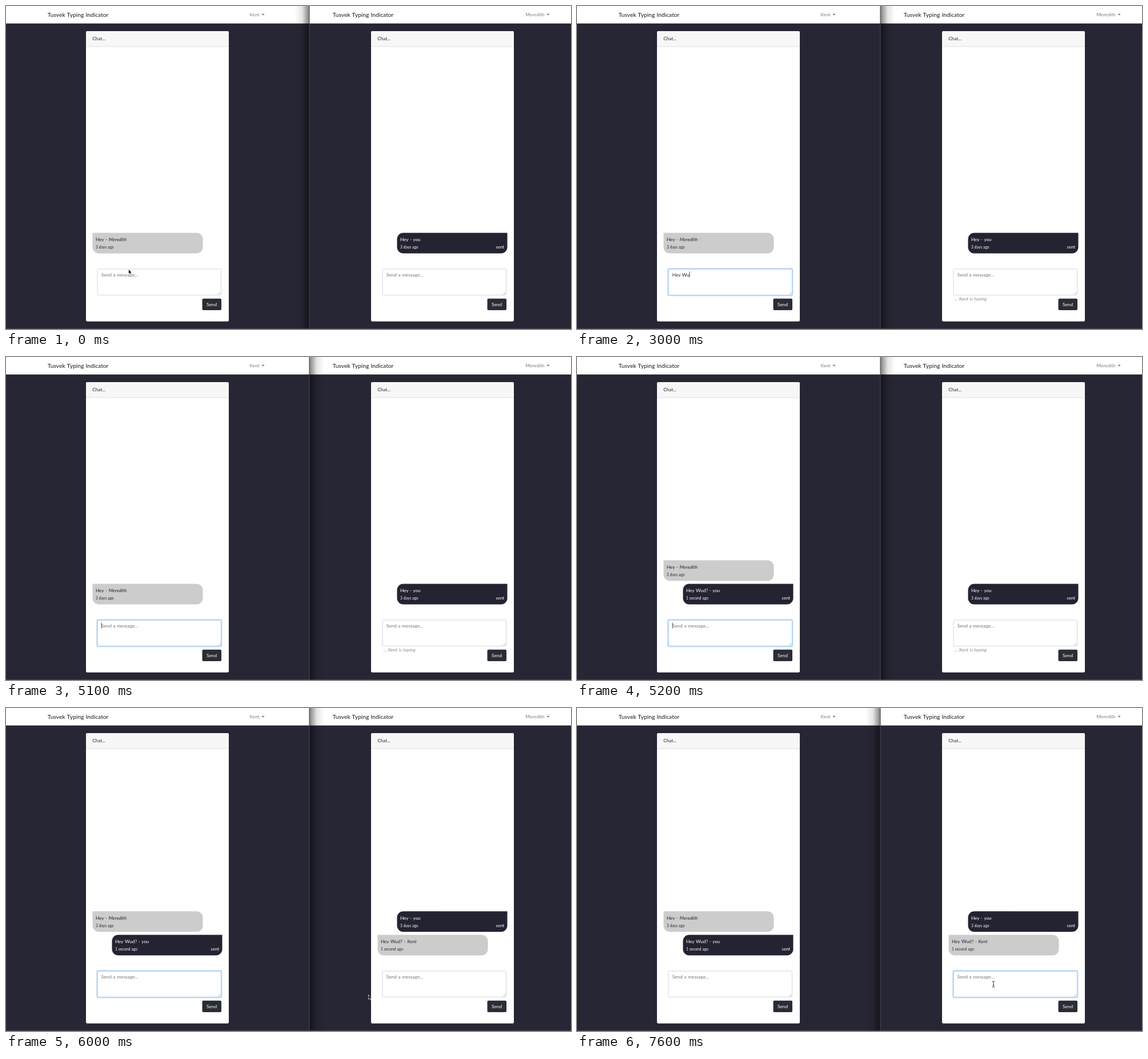
An HTML page for the animation above (8000 ms loop, 989 by 566 pixels).

```html
<!DOCTYPE html>
<html lang="en">
<head>
<meta charset="utf-8">
<title>Typing indicator</title>
<style>
  html, body { margin: 0; width: 100%; height: 100%; overflow: hidden; background: #272634; }
  svg { display: block; width: 989px; height: 566px; }
  text { font: 8.3px Lato, sans-serif; word-spacing: .06em; white-space: pre; fill: #212529; }
  .brand { font-size: 10.25px; fill: #191919; }
  .user { fill: #7f7f7f; text-anchor: end; }
  .small { font-size: 6.65px; }
  .end { text-anchor: end; }
  .hint { fill: #6c757d; }
  .light { fill: #fff; }
  .typing { fill: #8b8b8b; }
  .i { font-style: italic; }
</style>
</head>
<body>
<svg id="stage" viewBox="0 0 989 566"></svg>
<script>
const LOOP = 8000, STEP = 100, PANEL = 499, SPLIT = 531;
const LEFT = 'Kent', RIGHT = 'Meredith';
const stage = document.getElementById('stage');

const typed = [[0, ''], [1700, 'H'], [1800, 'He'], [2100, 'Hey'], [2600, 'Hey '], [2700, 'Hey W'],
  [3000, 'Hey Wu'], [3700, 'Hey Wud'], [4800, 'Hey Wud?'], [5100, '']];
const caretOn = [[0, 0], [800, 1], [1300, 0], [1700, 1], [3500, 0], [3700, 1], [4200, 0],
  [4700, 1], [5600, 0], [6100, 1], [6500, 0], [7100, 1], [7600, 0]];
const mouse = [[0, [214.5, 461.5]], [100, [208, 480]], [400, [206, 477]], [1700, null],
  [5800, [206, 477]], [5900, [430, 505]], [6000, [634.5, 502.5]], [6100, [698, 492]],
  [6200, [722, 486]], [6300, [729, 484]]];

const at = (track, t) => track.findLast(([start]) => start <= t)[1];
const ramp = (t, start, steps) => Math.max(0, Math.min(1, ((t - start) / STEP + 1) / steps));
const rect = (x, y, w, h, fill, more = '') =>
  `<rect x="${x}" y="${y}" width="${w}" height="${h}" fill="${fill}" ${more}/>`;
const text = (x, y, cls, s) => `<text x="${x}" y="${y}" class="${cls}">${s}</text>`;

function bubble(y, body, who, age) {
  const mine = who === 'you', x = mine ? 185.5 : 151.5, r = 11, w = 193, h = 36;
  const tone = mine ? 'light' : '';
  const shape = mine
    ? `M${x + r} ${y}H${x + w}v${h - r}a${r} ${r} 0 0 1 ${-r} ${r}H${x + r}a${r} ${r} 0 0 1 ${-r} ${-r}V${y + r}a${r} ${r} 0 0 1 ${r} ${-r}z`
    : `M${x} ${y}H${x + w - r}a${r} ${r} 0 0 1 ${r} ${r}v${h - 2 * r}a${r} ${r} 0 0 1 ${-r} ${r}H${x + r}a${r} ${r} 0 0 1 ${-r} ${-r}z`;
  return `<path d="${shape}" fill="${mine ? '#242331' : '#ccc'}"/>` +
    text(x + 5.4, y + 14.4, tone, `${body} - <tspan class="i">${who}</tspan>`) +
    text(x + 5.4, y + 27.3, tone + ' small', age) +
    (mine ? text(x + w - 5.3, y + 27.5, 'light i end', 'sent') : '');
}

function field(glow, value) {
  const ring = glow ? rect(158.9, 459.9, 218.7, 47.7, 'none',
    `rx="2.5" stroke="#3490dc" stroke-opacity="${.27 * glow}" stroke-width="1.8"`) : '';
  return ring + rect(160, 461, 216.5, 45.5, '#fff', 'rx="2" stroke="#d3d8dd"') +
    (glow ? rect(160, 461, 216.5, 45.5, 'none', `rx="2" stroke="#a1cbef" stroke-opacity="${glow}"`) : '') +
    '<path d="M371.5 505.5l4-4M374 505.5l1.5-1.5" stroke="#888" stroke-width=".6"/>' +
    (value ? text(166.7, 473.6, 'value', value) : text(166.7, 473.6, 'hint', 'Send a message...'));
}

function panel(offset, user, messages, glow, value, note) {
  const top = 397.5 - 41.2 * (messages.length - 1);
  return `<g transform="translate(${offset})">` +
    text(72.8, 19.2, 'brand', 'Tusvek Typing Indicator') +
    text(443.7, 18, 'user', user) + '<path d="M447.3 13.8h5.4l-2.7 2.8z" fill="#777"/>' +
    rect(140, 44, 250, 508.7, '#fff', 'rx="2.5"') +
    '<path d="M140 71V46.5a2.5 2.5 0 0 1 2.5-2.5h245a2.5 2.5 0 0 1 2.5 2.5V71z" fill="#f7f7f7"/>' +
    rect(140, 70.6, 250, .9, '#dcdcdc') + text(151.2, 60.4, '', 'Chat...') +
    messages.map((m, i) => bubble(top + 41.2 * i, ...m)).join('') +
    field(glow, value) +
    (note ? text(161.8, 516, 'typing i', note) : '') +
    rect(343.5, 512.7, 33.5, 20.3, '#2a2d35', 'rx="2"') + text(351, 525.6, 'light', 'Send') + '</g>';
}

function pointer(pos) {
  if (!pos) return '';
  const [x, y] = pos, px = x > SPLIT ? x - PANEL : x;
  const overField = px > 160 && px < 377 && y > 465 && y < 507;
  const shape = overField
    ? '<path d="M-2.3-5Q0-5 0-3.6Q0-5 2.3-5M0-3.6V3.8M-2.3 5Q0 5 0 3.8Q0 5 2.3 5M-1.2 1.8H1.2" fill="none" stroke="#222" stroke-width=".9"/>'
    : '<path d="M0 0V8L1.9 6.3L3.2 9.2L4.6 8.6L3.4 5.8H5.8z" fill="#000" stroke="#fff" stroke-width=".7"/>';
  return `<g transform="translate(${x} ${y})">${shape}</g>`;
}

function draw(t) {
  const leftActive = t >= 400 && t < 6500;
  const leftGlow = t < 6500 ? ramp(t, 700, 3) : 1 - ramp(t, 6500, 3);
  const value = at(typed, t);
  const isTyping = (t >= 1900 && t < 3700) || (t >= 4100 && t < 5300);
  const first = who => ['Hey', who, '3 days ago'];
  const reply = who => ['Hey Wud?', who, '1 second ago'];
  const shadowX = leftActive ? SPLIT : SPLIT - 26;

  stage.innerHTML =
    `<defs><linearGradient id="shade" ${leftActive ? 'x1="1" x2="0"' : ''}>
      <stop offset="0" stop-opacity="0"/><stop offset=".5" stop-opacity=".1"/><stop offset="1" stop-opacity=".5"/>
    </linearGradient></defs>` +
    rect(0, 0, 989, 566, '#272634') + rect(0, 0, 989, 30, '#fff') + rect(0, 30, 989, .8, '#c3cfc3') +
    panel(0, LEFT, t < 5200 ? [first(RIGHT)] : [first(RIGHT), reply('you')], leftGlow, value, '') +
    panel(PANEL, RIGHT, t < 5300 ? [first('you')] : [first('you'), reply(LEFT)],
      ramp(t, 7100, 2), '', isTyping && `... ${LEFT} is typing`) +
    rect(shadowX, 0, 26, 566, 'url(#shade)') +
    rect(SPLIT - .5, 0, 1, 31, '#44434c') + rect(SPLIT - .5, 31, 1, 535, '#4b4a56') +
    rect(0, 565, 989, 1, '#45444f') + pointer(at(mouse, t));

  if (at(caretOn, t)) {
    const label = stage.querySelector('.value');
    const x = t >= 7100 ? 166.7 + PANEL : 166.7 + (label ? label.getComputedTextLength() : 0);
    stage.insertAdjacentHTML('beforeend', rect(x, 465.5, .8, 10, '#222'));
  }
}

let shown = -1;
function tick() {
  const t = Math.floor(performance.now() % LOOP / STEP) * STEP;
  if (t !== shown) draw(shown = t);
  requestAnimationFrame(tick);
}
tick();
</script>
</body>
</html>
```
